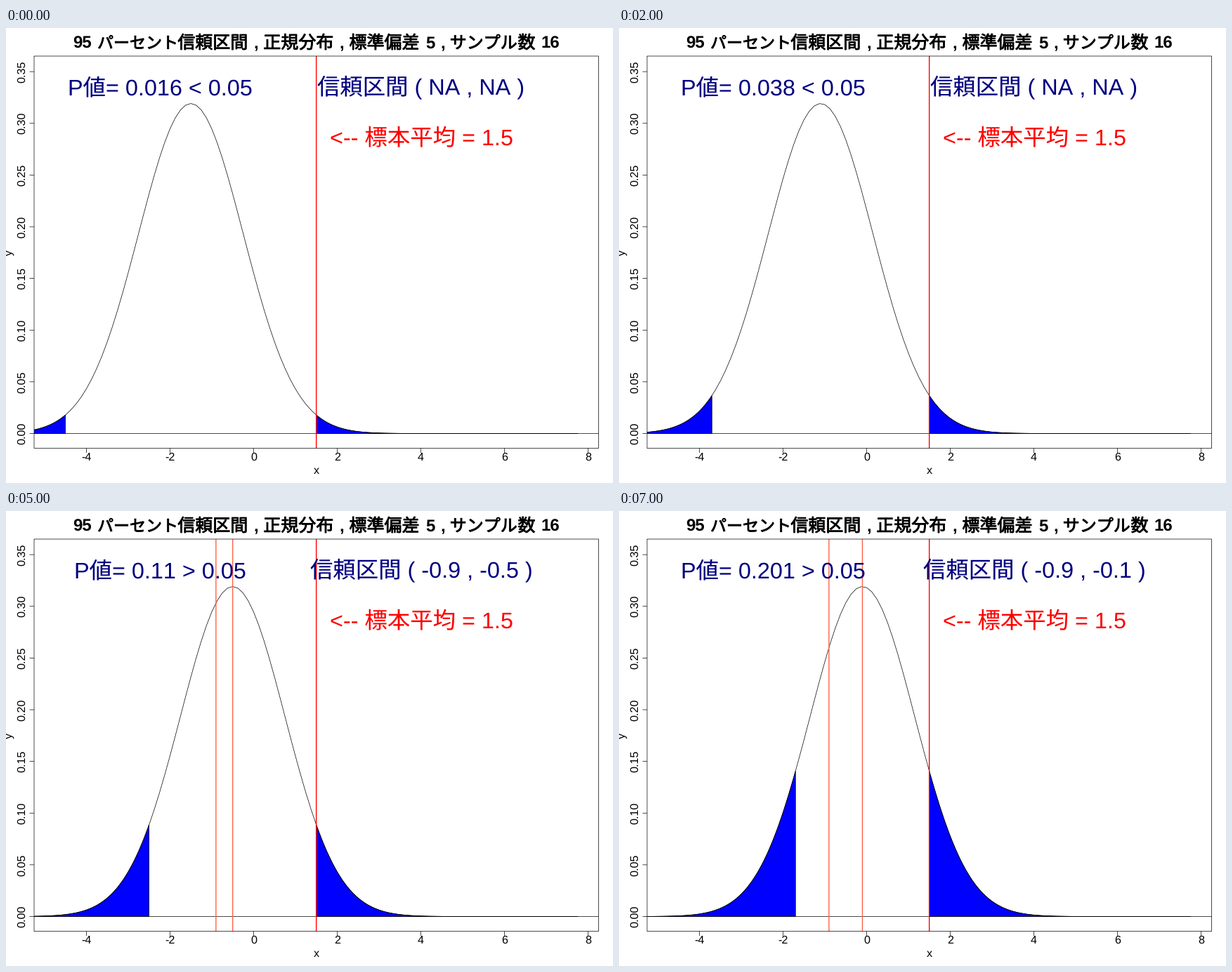
Recreate the animation shown at these times as a matplotlib script. Size 864 by 648 pixels, loop 8 s.

```python
import math

import matplotlib.pyplot as plt
import numpy as np
from matplotlib import patheffects
from matplotlib.animation import FuncAnimation
from matplotlib.patches import Rectangle

plt.rcParams["text.hinting"] = "none"
plt.rcParams["text.kerning_factor"] = 12
plt.rcParams["font.family"] = ["Liberation Sans", "Noto Sans CJK JP"]

W, H = 864, 648
LEFT, RIGHT, TOP, BOTTOM = 40, 843.5, 40, 598.5
SE = 5 / math.sqrt(16)
SAMPLE_MEAN = 1.5
ALPHA = 0.05
MEANS = np.round(np.arange(8) * 0.2 - 1.5, 1)

# One point equals one pixel; the axes use pixel coordinates with y downwards.
fig = plt.figure(figsize=(W / 72, H / 72), dpi=72, facecolor="white")
ax = fig.add_axes([0, 0, 1, 1])
ax.set_xlim(0, W)
ax.set_ylim(H, 0)
ax.axis("off")
frame = Rectangle((LEFT, TOP), RIGHT - LEFT, BOTTOM - TOP,
                  transform=ax.transData)


def px(x):
    return 352.4 + 59.5 * x


def py(y):
    return 577.5 - 1472.5 * y


def density(x, mean):
    z = (x - mean) / SE
    return np.exp(-z * z / 2) / (SE * math.sqrt(2 * math.pi))


def line(xs, ys, color="black", lw=0.7, z=2):
    return ax.plot(xs, ys, color=color, lw=lw, zorder=z, snap=False,
                   solid_capstyle="butt")[0]


def vline(x, color):
    return line([px(x)] * 2, [TOP, BOTTOM], color, 1.4, 4)


def tail_area():
    area = ax.fill([0], [0], fc="blue", ec="black", lw=0.7, zorder=1,
                   snap=False)[0]
    area.set_clip_path(frame)
    return area


def label(x, y, s, size=16.1, color="black", **kw):
    kw.setdefault("ha", "center")
    return ax.text(x, y, s, fontsize=size, color=color, va="baseline",
                   rotation_mode="anchor", zorder=5, **kw)


def draw_title():
    base = 29
    for x, s in [(108.7, "95"), (356, ","), (478.2, ","),
                 (603.7, "5"), (621.3, ","), (774.5, "16")]:
        label(x, base, s, 24, weight="bold")
    stroke = [patheffects.withStroke(linewidth=0.9, foreground="black")]
    for x, s, size in [(130, "パーセント", 23), (244.3, "信頼区間", 25),
                       (366.3, "正規分布", 25), (488.5, "標準偏差", 25),
                       (631.7, "サンプル", 24), (728.5, "数", 25)]:
        label(x, base, s, size, ha="left", path_effects=stroke)


def draw_axes():
    line([LEFT, RIGHT, RIGHT, LEFT, LEFT],
         [TOP, TOP, BOTTOM, BOTTOM, TOP], z=6)
    for x in range(-4, 9, 2):
        line([px(x)] * 2, [BOTTOM, BOTTOM + 6.5])
        label(px(x), 616, str(x))
    for i in range(8):
        y = py(i * 0.05)
        line([LEFT - 6.5, LEFT], [y, y])
        label(27.5, y, f"{i * 0.05:.2f}", rotation=90)
    label(441.5, 635, "x")
    label(8.5, 319.5, "y", rotation=90)
    line([LEFT, RIGHT], [py(0)] * 2)


draw_title()
draw_axes()
label(591, 166.5, "<-- 標本平均 = 1.5", 32.4, "red")
vline(SAMPLE_MEAN, "red")

grid = np.arange(-5.25, 7.76, 0.125)
curve = line(px(grid), py(0 * grid))
tails = [tail_area() for _ in range(2)]
bounds = [vline(0, "tomato") for _ in range(2)]
p_text = label(219, 95.8, "", 32.4, "navy")
ci_text = label(591, 94, "", 32.4, "navy")


def p_value(mean):
    return math.erfc((SAMPLE_MEAN - mean) / SE / math.sqrt(2))


def update(i):
    mean = MEANS[i]
    curve.set_ydata(py(density(grid, mean)))

    spans = [(-6, 2 * mean - SAMPLE_MEAN), (SAMPLE_MEAN, 7.75)]
    for (a, b), tail in zip(spans, tails):
        xs = np.linspace(a, b, 80)
        tail.set_xy(np.column_stack([
            px(np.r_[a, xs, b]), py(np.r_[0, density(xs, mean), 0])]))

    p = p_value(mean)
    sign = "<" if p < ALPHA else ">"
    p_text.set_text(f"P値= {round(p, 3):g} {sign} {ALPHA}")

    accepted = [m for m in MEANS[:i + 1] if p_value(m) >= ALPHA]
    low, high = (accepted[0], accepted[-1]) if accepted else ("NA", "NA")
    ci_text.set_text(f"信頼区間 ( {low} , {high} )")
    for bound, x in zip(bounds, (low, high)):
        bound.set_visible(bool(accepted))
        if accepted:
            bound.set_xdata([px(x)] * 2)
    return [curve, *tails, *bounds, p_text, ci_text]


anim = FuncAnimation(fig, update, frames=len(MEANS), interval=1000,
                     repeat=True, repeat_delay=0)
plt.show()
```
